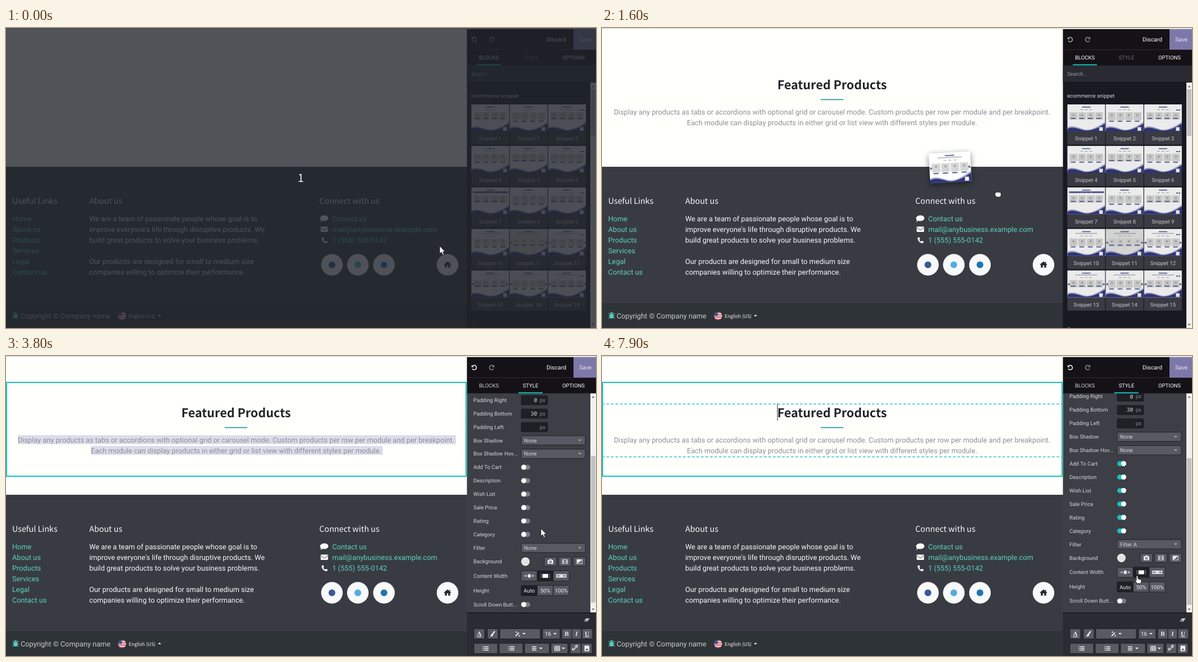
Write an HTML page that moves like this. It is 1049 px wide and 534 px high and loops after 8000 ms.

```html
<!DOCTYPE html>
<html lang="en">
<head>
<meta charset="utf-8">
<title>Website builder</title>
<style>
html, body { margin: 0; width: 100%; height: 100%; overflow: hidden; background: #fffffc; }
svg { display: block; width: 1049px; height: 534px; font-family: Roboto, sans-serif; text-rendering: geometricPrecision; }
.head { font-family: "Noto Sans CJK JP", "Noto Sans CJK SC", "Noto Sans CJK", sans-serif; }
.mono { font-family: "Noto Sans Mono", monospace; }
#drag { filter: drop-shadow(0 3px 5px rgba(0, 0, 0, .5)); }
</style>
</head>
<body>
<svg id="stage" viewBox="0 0 1049 534"></svg>
<script>
const LOOP = 8000, STEP = 100;
const TEAL = '#17c1bc', LINK = '#5fcfc0', NAVY = '#2d3478', BTN = '#595964', DARK = '#1f1f26';

// Markup helpers
const rect = (x, y, w, h, fill, more = '') =>
  `<rect x="${x}" y="${y}" width="${w}" height="${h}" fill="${fill}" ${more}/>`;
const circle = (x, y, r, fill, more = '') =>
  `<circle cx="${x}" cy="${y}" r="${r}" fill="${fill}" ${more}/>`;
const path = (d, fill, more = '') => `<path d="${d}" fill="${fill}" ${more}/>`;
const line = (d, color, width = 1, more = '') =>
  path(d, 'none', `stroke="${color}" stroke-width="${width}" ${more}`);
const text = (x, y, s, size, fill, more = '') =>
  `<text x="${x}" y="${y}" font-size="${size}" fill="${fill}" ${more}>${s}</text>`;
const group = (id, body, more = '') => `<g id="${id}" ${more}>${body}</g>`;
const at = (x, y, body) => `<g transform="translate(${x} ${y})">${body}</g>`;
const rep = (n, fn) => Array.from({ length: n }, (_, i) => fn(i)).join('');
const MID = 'text-anchor="middle"', HEAD = 'class="head"';
const down = (x, y, fill, r = 3) => path(`M${x - r} ${y - r / 2}h${2 * r}l${-r} ${r}z`, fill);
const up = (x, y, fill, r = 3) => path(`M${x - r} ${y + r / 2}h${2 * r}l${-r} ${-r}z`, fill);

function scrollbar(x, w, y0, y1, thumbY, thumbH, id) {
  const c = x + w / 2;
  return rect(x, y0, w, y1 - y0, '#f1f1f1') + rect(x + 1, thumbY, w - 2, thumbH, '#c1c1c1', `id="${id}"`) +
    up(c, y0 + 7, '#505050', 2.6) + down(c, y1 - 6, '#505050', 2.6);
}

// Page
function intro() {
  const lines = [
    'Display any products as tabs or accordions with optional grid or carousel mode. Custom products per row per module and per breakpoint.',
    'Each module can display products in either grid or list view with different styles per module.'];
  return group('marked', rect(21, 141, 779, 16, '#dcdcec') + rect(151, 160, 519, 16, '#dcdcec')) +
    text(409, 109.2, 'Featured Products', 21.5, '#212529', `${HEAD} font-weight="700" ${MID}`) +
    rect(389, 126.5, 40, 1.8, '#35979c') +
    lines.map((s, i) => text(409, 154 + i * 19.1, s, 12.76, '#8d8f94', MID)).join('') +
    group('outline', line('M1 47H818V214H1Z', TEAL, 2)) +
    group('guides', line('M0 85.5H818M0 179.5H818', '#2fc3cd', 1.5, 'stroke-dasharray="4.8 3.2"')) +
    group('caretText', rect(467, 142, 1, 15, '#333')) +
    group('caretHead', rect(311.5, 85, 1, 30, '#222'));
}

function footer() {
  const row = (i) => 343.5 + i * 19.14;
  const body = (x, i, s, fill = '#f8f9fa') => text(x, row(i), s, 12.76, fill);
  const title = (x, s) => text(x, 313, s, 14.3, '#f8f9fa', HEAD);
  const badge = (x, color) => circle(x, 421.5, 19.2, '#f8f9fa') + (color ? circle(x, 421.5, 6, color) : '');
  const links = ['Home', 'About us', 'Products', 'Services', 'Legal', 'Contact us'];
  const about = ['We are a team of passionate people whose goal is to',
    "improve everyone's life through disruptive products. We",
    'build great products to solve your business problems.', '',
    'Our products are designed for small to medium size',
    'companies willing to optimize their performance.'];
  const contact = ['Contact us', 'mail@anybusiness.example.com', '1 (555) 555-0142'];
  const icons =
    path('M566 333.5c9.500 0 9.500 10 0 10q-2 0-3-.5-2 1.700-4.500 1.700 1.500-1.500 1.500-2.700c-3.500-3-1-8.500 6-8.500z', '#fff') +
    rect(559.5, 353.5, 13, 9.5, '#fff', 'rx="1"') + line('M560 355.500l6 4.500 6-4.500', '#383c42') +
    path('M561.500 373l2.500-.8 1.500 3-1.500 1.500q1 2.500 3.500 3.500l1.500-1.500 2.800 1.500-.8 2.500c-5 1.500-11-5-9.500-9.700z', '#fff');
  const house = path('M785 415.500l6.500 5.600-.8.9-1-.8v5.300h-3.500v-4h-2.400v4h-3.500v-5.300l-1 .8-.8-.9zM788 416h1.500v3l-1.500-1.300z', '#24282d');
  const bug = at(17, 511.5, path('M-2.500-3a2.500 2.500 0 0 1 5 0zM-3.300-2.200h6.600v4.500a3.300 3.300 0 0 1-6.600 0z', LINK) +
    line('M-5-4l2 2M5-4l-2 2M-5.500 1h11M-5 5.500l2-2M5 5.500l-2-2', LINK, 1.2));
  const flag = `<g clip-path="url(#flag)">${rect(199, 505, 15, 15, '#f4f4f4')}` +
    rep(4, i => rect(199, 505.5 + i * 4, 15, 2, '#d4465c')) + rect(199, 505, 7, 7.5, '#3f4f8c') + '</g>';
  return rect(0, 247, 820, 290, '#383c42') + rect(0, 489.5, 820, 45, '#2e3337') +
    title(11, 'Useful Links') + links.map((s, i) => body(11, i, s, LINK)).join('') +
    group('col2', title(148, 'About us') + about.map((s, i) => body(148, i, s)).join('')) +
    group('col3', title(557, 'Connect with us') + contact.map((s, i) => body(580, i, s, LINK)).join('') +
      icons + badge(579.5, '#3b5998') + badge(625.5, '#55acdf') + badge(672, '#1f77ab')) +
    group('col4', badge(785) + house) +
    bug + text(26, 516.5, 'Copyright © Company name', 12.76, '#c9cbcd') + flag +
    text(218, 515.6, 'English (US)', 8.55, '#f8f9fa', HEAD) + up(273, 511.5, '#f8f9fa', 2.8);
}

const zone = () =>
  rect(16, 63, 774.5, 220, '#e8e8ee') +
  line('M15.200 63H791.300M15.200 283H791.300M16 62.200V283.800M790.500 62.200V283.800', '#8f8f93', 1.6, 'stroke-dasharray="4.8 3.2"') +
  text(403, 178.3, 'DRAG BUILDING BLOCKS HERE', 15.85, '#999', MID) +
  scrollbar(807, 12, 1, 534, 13, 464, 'pageThumb');

// Snippet thumbnail, 67 by 48
function thumb(n) {
  const y = n > 9 ? 17 : 14, h = n % 3 === 2 ? 14 : 13;
  const card = i => {
    const x = 4 + i * 15.2;
    return rect(x, y, 13.6, h, '#d6d6d4') + circle(x + 6.8, y + 5, 2, '#aaabab') +
      rect(x + 2, y + h - (n % 2 ? 3 : -1), 8.5, 1.8, '#4c5790');
  };
  return rect(0, 0, 67, 48, n === 11 ? '#e4e4e2' : '#fff') +
    (n === 7 ? rect(3, 7, 62, 3, '#4c5790') : '') +
    rect(26, 4, 15, 1.6, n === 4 ? '#3b7c9c' : '#4c5790') +
    (n > 9 ? rect(14, 7.5, 39, 1, '#8d8e92') : '') +
    rep(3, i => rect(23 + i * 8, n > 9 ? 12 : 9, 5, 1, '#a0a1a3')) + rep(4, card) +
    (n % 3 === 0 ? rep(2, i => rect(57 + i * 4, 9, 3, 2, '#4c5790')) : '') +
    (n > 10 ? rect(1, 23, 3, 3, '#4c5790') + rect(63, 23, 3, 3, '#4c5790') : '') +
    path('M0 41C8 37 16 40 28 44S54 40 67 31V48H0Z', '#a9abd0') +
    path('M0 43.500C8 39.500 16 42 27 45.500S54 43 67 34V48H0Z', NAVY) + rect(56.5, 40.5, 6.5, 6.5, '#f4f4f8');
}

// Sidebar
const gray = '#d4d4d8';
const turn = line('M-3.200-2.400A4 4 0 1 1-3.500 2.200', 'currentColor', 1.5) + path('M-4.700-4.600v4h4z', 'currentColor');

function topBar() {
  const tab = (x, id, s) => text(x, 55.5, s, 9.56, '#fff', `id="${id}" ${MID}`);
  return rect(819.5, 2, 229.5, 64.5, '#141217') + rect(819.5, 38, 229.5, 1, '#2b2b33') +
    `<g transform="translate(832.500 20.500)" color="#a9a9ad" id="undo">${turn}</g>` +
    `<g transform="translate(863.500 20.500) scale(-1 1)" color="#8d8d92">${turn}</g>` +
    text(978.5, 24.2, 'Discard', 10.36, '#fff', MID) + rect(1009, 2, 40, 36.5, '#7c78a9') +
    text(1030, 24.2, 'Save', 10.36, '#e8e6f2', MID) +
    tab(858.5, 'tabBlocks', 'BLOCKS') + tab(932.5, 'tabStyle', 'STYLE') + tab(1009, 'tabOptions', 'OPTIONS') +
    rect(837, 64.5, 43, 2, TEAL, 'id="tabLine"');
}

function blocks() {
  const tile = i => {
    const x = 827.5 + (i % 3) * 68.2, y = 136 + Math.floor(i / 3) * 73.9;
    return at(x, y, rect(0, 0, 67, 71.5, '#3a3a42') + `<g opacity=".9">${thumb(i + 1)}</g>` +
      text(33.5, 64.3, 'Snippet ' + (i + 1), 9.56, '#c6c6ca', MID));
  };
  return rect(819.5, 66, 229.5, 468, '#191922') + rect(819.5, 66.5, 229.5, 30, '#2a2a32') + rect(819.5, 96, 229.5, 1, '#101014') +
    text(827, 84.8, 'Search...', 9.56, '#9a9aa0', 'font-style="italic"') +
    text(827, 123.5, 'ecommerce snippet', 9.56, gray) + rep(15, tile) +
    text(827, 540, 'Structure', 9.56, gray) + scrollbar(1039, 10, 97, 534, 109, 83, 'blockThumb');
}

const button = (x, y, w, h, fill = BTN) => rect(x, y, w, h, fill, 'rx="1.500" stroke="#17171c" stroke-width=".8"');

// Rows are laid out as seen when scrolled to the end.
function options() {
  const pitch = 23.92, rowY = i => 72 + i * pitch;
  const label = (y, s) => text(831, y + 3.4, s, 9.56, gray);
  const number = (i, s, v) => label(rowY(i), s) + button(916, rowY(i) - 8, 47, 16.5, DARK) +
    text(944.5, rowY(i) + 3.5, v, 9.8, gray, 'class="mono" text-anchor="end"') +
    text(949, rowY(i) + 3.3, 'px', 9.56, '#85858c');
  const select = (i, s, id) => label(rowY(i), s) + button(916, rowY(i) - 8.2, 114, 16.4) +
    text(921, rowY(i) + 3.4, 'None', 9.56, gray, `id="${id}"`) + down(1020, rowY(i), '#a9a9b0', 3);
  const toggle = (i, s, id) => label(rowY(i), s) + rect(916, rowY(i) - 4.3, 16, 8.6, '#7d7d85', `rx="4.300" id="${id}"`) +
    circle(920.5, rowY(i), 4.5, '#fff', `id="${id}Knob"`);
  const margins = ['Margin Top', 'Margin Right', 'Margin Bottom', 'Margin Left', 'Padding Top'];
  const trio = (y, draw) => rep(3, i => button(916 + i * 28.5, y - 9, 28.3, 18, i === draw.on ? DARK : BTN) +
    at(930.3 + i * 28.5, y, draw.icons[i]));
  const white = s => text(0, 3.5, s, 9.56, '#ececf0', MID);
  const picture = rect(-5, -4, 10, 8, '#e8e8ec') + path('M-4 3l4-2 4-4v6z', '#55555e');
  const film = rect(-5, -4, 10, 8, '#e8e8ec') + rect(-2.5, -3, 5, 2.5, BTN) + rect(-2.5, .5, 5, 2.5, BTN) +
    line('M-4-4v8M4-4v8', BTN, 1, 'stroke-dasharray="1 1"');
  const camera = path('M-5-3h2.500l1-1.500h3l1 1.500h2.500v7h-10z', '#e8e8ec') + circle(0, .5, 2.2, BTN) + circle(0, .5, 1.1, '#e8e8ec');
  const narrow = rect(-2.5, -3, 5, 6, '#e8e8ec') + line('M-9 0h4M9 0h-4M-6.500-1.800l2 1.800-2 1.800M6.500-1.800l-2 1.800 2 1.800', '#e8e8ec');
  const normal = rect(-5, -3.5, 10, 7, '#fff') + line('M-7.500-4v8M7.500-4v8', '#8d8d94', 1);
  const wide = rect(-9, -3, 18, 6, '#e8e8ec') + line('M-7 0h5M7 0h-5M-5-1.500l-2 1.500 2 1.500M5-1.500l2 1.500-2 1.500', '#44444c');
  return text(831, 72 - 6 * pitch + 3.4, 'Block', 9.56, '#fff', 'font-weight="700"') +
    margins.map((s, i) => number(i - 5, s, '')).join('') +
    number(0, 'Padding Right', 0) + number(1, 'Padding Bottom', 30) + number(2, 'Padding Left', '') +
    select(3, 'Box Shadow', 'shadow') + select(4, 'Box Shadow Hov...', 'hoverShadow') +
    ['Add To Cart', 'Description', 'Wish List', 'Sale Price', 'Rating', 'Category']
      .map((s, i) => toggle(5 + i, s, 'sw' + i)).join('') +
    select(11, 'Filter', 'filter') +
    label(359.3, 'Background') + circle(923.5, 359.5, 7.5, '#f2f2ee') +
    rep(12, i => rect(917.8 + (i % 4) * 3 + (i >> 2) % 2 * 1.5, 355 + (i >> 2) * 3.2, 1.5, 3, '#cfcfcb')) +
    [camera, film, picture].map((icon, i) => button(957 + i * 25.8, 351.5, 22, 16) + at(968 + i * 25.8, 359.5, icon)).join('') +
    label(385, 'Content Width') + trio(385, { on: 1, icons: [narrow, normal, wide] }) +
    label(411, 'Height') + trio(411, { on: 0, icons: [white('Auto'), white('50%'), white('100%')] }) +
    toggle((436 - 72) / pitch, 'Scroll Down Butt...', 'swScroll');
}

function menu() {
  return rect(916, 344, 114, 72, '#2b2b33', 'stroke="#111"') + rect(916.5, 368, 113, 24, BTN) +
    ['None', 'Filter A', 'Filter B'].map((s, i) => text(921, 359.5 + i * 24, s, 9.56, gray)).join('');
}

function tools() {
  const w = '#f0f0f2';
  const letter = (x, s, more) => text(x, 498.2, s, 11, w, `${MID} font-weight="700" font-family="Liberation Serif, serif" ${more}`);
  const bars = (x, dot) => line(`M${x - 3} 517.500h8M${x - 3} 520.500h8M${x - 3} 523.500h8`, w, 1.4) +
    (dot ? line(`M${x - 5.5} 517.500h1.500M${x - 5.5} 520.500h1.500M${x - 5.5} 523.500h1.500`, w, 1.4) : '');
  const top = [[832, 19], [856, 19], [878, 72], [954, 31], [988, 18], [1006, 17], [1024, 19]];
  const low = [[832, 42], [877, 42], [922, 44], [969, 30], [1003, 19], [1023, 19]];
  return rect(819.5, 457, 229.5, 77, '#2b2b33') + rect(819.5, 456.5, 229.5, 1.5, '#141217') +
    path('M1031 467h6.500l-4 6h-6.500z', '#c9c9ce') + path('M1029.300 470h4.500l-2 3h-4.500z', '#77777e') +
    top.map(([x, n]) => button(x, 485.5, n, 18)).join('') + low.map(([x, n]) => button(x, 511.5, n, 18)).join('') +
    letter(841.5, 'A', 'text-decoration="underline"') + line('M869 490l-4 5', w, 2.2) + path('M865 494l1.500 2q-1 4-6 3 2-1 2-3z', w) +
    line('M906 498.500l6-6', w, 1.8) + line('M906 491.500h3M907.500 490v3M912.500 496.500v3M911 498h3', w, .9) + down(921, 494.5, w) +
    text(963.5, 498.2, '16', 10, w, MID) + down(976, 494.5, w) +
    letter(997, 'B', '') + letter(1014.5, 'I', 'font-style="italic"') + letter(1033, 'U', 'text-decoration="underline"') +
    bars(853, 1) + bars(899, 1) + bars(938) + down(951, 520.5, w) +
    line('M975.500 516.500h9v8h-9zM975.500 519.200h9M975.500 521.800h9M978.500 516.500v8M981.500 516.500v8', w) + down(991, 520.5, w) +
    line('M1011 521.500l-2 2a2 2 0 0 1-2-2l2-2M1014 519l2-2a2 2 0 0 0-2-2l-2.500 2.500M1010 522l4-4', w, 1.3) +
    rect(1028.5, 515.5, 8.5, 10, w) + path('M1030 523.500l2.500-3 3.500 3z', '#44444c');
}

const cursors = {
  arrow: path('M0 0V13.800L3.200 11 5.400 16.200 7.800 15.200 5.700 10.200H9.800Z', '#fff', 'stroke="#111" stroke-width=".9"'),
  beam: line('M-3.500-6H3.500M0-6V6M-3.500 6H3.500', '#fff', 3) + line('M-3.500-6H3.500M0-6V6M-3.500 6H3.500', '#111', 1.4),
  fist: path('M-5-1.500Q-5-4-2.500-4 0-5.500 2-4 5-4.500 5.500-2V2L4 5H-3L-5.500 1Z', '#fff', 'stroke="#111" stroke-width="1"') +
    line('M-2-3.500v2M.500-3.800v2.200M3-3.500v2', '#111', .7),
  hand: path('M-2-1Q-.5-3 1-1V3.500L6 5Q7.500 5.500 7 8L6 12H-.5L-4.500 6.500Q-4.500 5-2 6.500Z', '#fff', 'stroke="#111" stroke-width="1"')
};

document.getElementById('stage').innerHTML =
  `<defs><clipPath id="flag"><circle cx="206.500" cy="512.500" r="7"/></clipPath>
   <clipPath id="panel"><rect x="819" y="66.500" width="220" height="390.500"/></clipPath></defs>` +
  rect(0, 0, 1049, 534, '#fffffc') + group('intro', intro()) + group('footer', footer()) + group('zone', zone()) +
  rect(0, 0, 1049, 1.5, '#dcdcda') +
  group('blocks', blocks()) +
  group('style', rect(819.5, 66, 229.5, 391, '#3e3e46') + `<g clip-path="url(#panel)">${group('options', options())}</g>` +
    scrollbar(1039, 10, 66, 457, 182, 261, 'styleThumb') + group('menu', menu()) + tools()) +
  topBar() +
  group('drag', thumb(14)) +
  group('veil', rect(0, 0, 1049, 534, 'rgba(33,37,44,.784)') + text(524, 274, '1', 20, '#f4f4f4', `${HEAD} ${MID}`)) +
  Object.entries(cursors).map(([k, v]) => group(k, v)).join('');

const $ = Object.fromEntries([...document.querySelectorAll('[id]')].map(e => [e.id, e]));
const show = (id, on) => { $[id].style.display = on ? '' : 'none'; };
const set = (id, name, value) => $[id].setAttribute(name, value);
const move = (id, x, y, more = '') => set(id, 'transform', `translate(${x} ${y})${more}`);

// time, x, y, shape
const track = [
  [400, 771, 388, 'arrow'], [500, 850, 440, 'arrow'], [600, 955, 480, 'arrow'], [700, 1021, 446, 'hand'],
  [900, 1021, 446, 'hand'], [1000, 945, 464, 'hand'], [1100, 945, 464, 'hand'], [1200, 979, 441, 'fist'],
  [1500, 640, 258, 'fist'], [1600, 704, 296, 'fist'], [1700, 800, 312, 'arrow'], [2000, 985, 316, 'arrow'],
  [2400, 660, 210, 'arrow'], [2600, 490, 162, 'beam'], [2700, 469, 155, 'beam'], [3200, 469, 155, 'beam'],
  [3300, 600, 200, 'arrow'], [3600, 951, 307, 'arrow'], [4000, 951, 307, 'arrow'], [4300, 925, 196, 'arrow'],
  [4500, 925, 196, 'arrow'], [4600, 925, 219, 'arrow'], [4900, 925, 219, 'arrow'], [5200, 925, 235, 'arrow'],
  [5400, 925, 235, 'arrow'], [5500, 925, 247, 'arrow'], [5600, 925, 247, 'arrow'], [5700, 925, 263, 'arrow'],
  [6100, 925, 286, 'arrow'], [6200, 925, 286, 'arrow'], [6300, 925, 293, 'arrow'], [6500, 925, 308, 'arrow'],
  [6700, 925, 308, 'arrow'], [6900, 934, 322, 'arrow'], [7000, 934, 322, 'arrow'], [7100, 938, 335, 'arrow'],
  [7400, 942, 376, 'arrow'], [7700, 946, 378, 'arrow'], [7800, 946, 378, 'arrow'], [7900, 952, 393, 'hand']];
const switchTimes = [4500, 4900, 5500, 5800, 6300, 6800];

function cursorAt(t) {
  const i = track.findLastIndex(k => k[0] <= t);
  if (i < 0) return track[0].slice(1);
  const a = track[i], b = track[i + 1] || a;
  const f = b === a ? 0 : (t - a[0]) / (b[0] - a[0]);
  return [a[1] + (b[1] - a[1]) * f, a[2] + (b[2] - a[2]) * f, a[3]];
}

function scrollAt(t) {
  if (t < 3500) return 0;
  return t < 3800 ? 147 * (t - 3400) / 400 : t < 3900 ? 146.6 : 153;
}

function draw(t) {
  const within = (a, b) => t >= a && t < b;
  const dragging = within(1200, 1500), styling = t >= 3100;
  const [x, y, shape] = cursorAt(t);

  show('veil', t < 100);
  show('zone', dragging);
  show('intro', t >= 1500);
  show('marked', within(3200, 4500));
  show('outline', styling);
  show('guides', t >= 7900);
  show('caretText', within(2900, 3200));
  show('caretHead', within(5800, 7200) || t >= 7600);

  move('footer', 0, dragging ? 52.6 : 0);
  [['col2', -2], ['col3', -8], ['col4', -12]].forEach(([id, dx]) => move(id, dragging ? dx : 0, 0));

  show('blocks', !styling);
  show('style', styling);
  show('menu', within(7200, 7500));
  set('undo', 'color', styling ? '#fff' : '#a9a9ad');
  set('tabStyle', 'fill', styling ? '#fff' : '#6d6d74');
  set('tabBlocks', 'fill', styling ? '#cfcfd3' : '#fff');
  set('tabLine', 'x', styling ? 911 : 837);

  const s = scrollAt(t);
  move('options', 0, 153 - s);
  set('styleThumb', 'y', 80 + s * 2 / 3);
  switchTimes.forEach((time, i) => {
    const on = t >= time;
    set('sw' + i, 'fill', on ? TEAL : '#7d7d85');
    set(`sw${i}Knob`, 'cx', on ? 927.5 : 920.5);
  });
  $.filter.textContent = t >= 7500 ? 'Filter A' : 'None';

  show('drag', within(1200, 1700));
  const size = 1 + 0.1 * Math.min(1, Math.max(0, (t - 1200) / 300));
  const [dx, dy] = t < 1600 ? [x - 17, y - 9] : [619, 248];
  move('drag', dx, dy, ` rotate(-3) scale(${size}) translate(-33.500 -24)`);

  for (const k in cursors) show(k, k === shape);
  move(shape, x, y);
}

const start = performance.now();
function tick() {
  const t = (performance.now() - start) % LOOP;
  draw(Math.floor(t / STEP) * STEP);
  requestAnimationFrame(tick);
}
tick();
</script>
</body>
</html>
```
